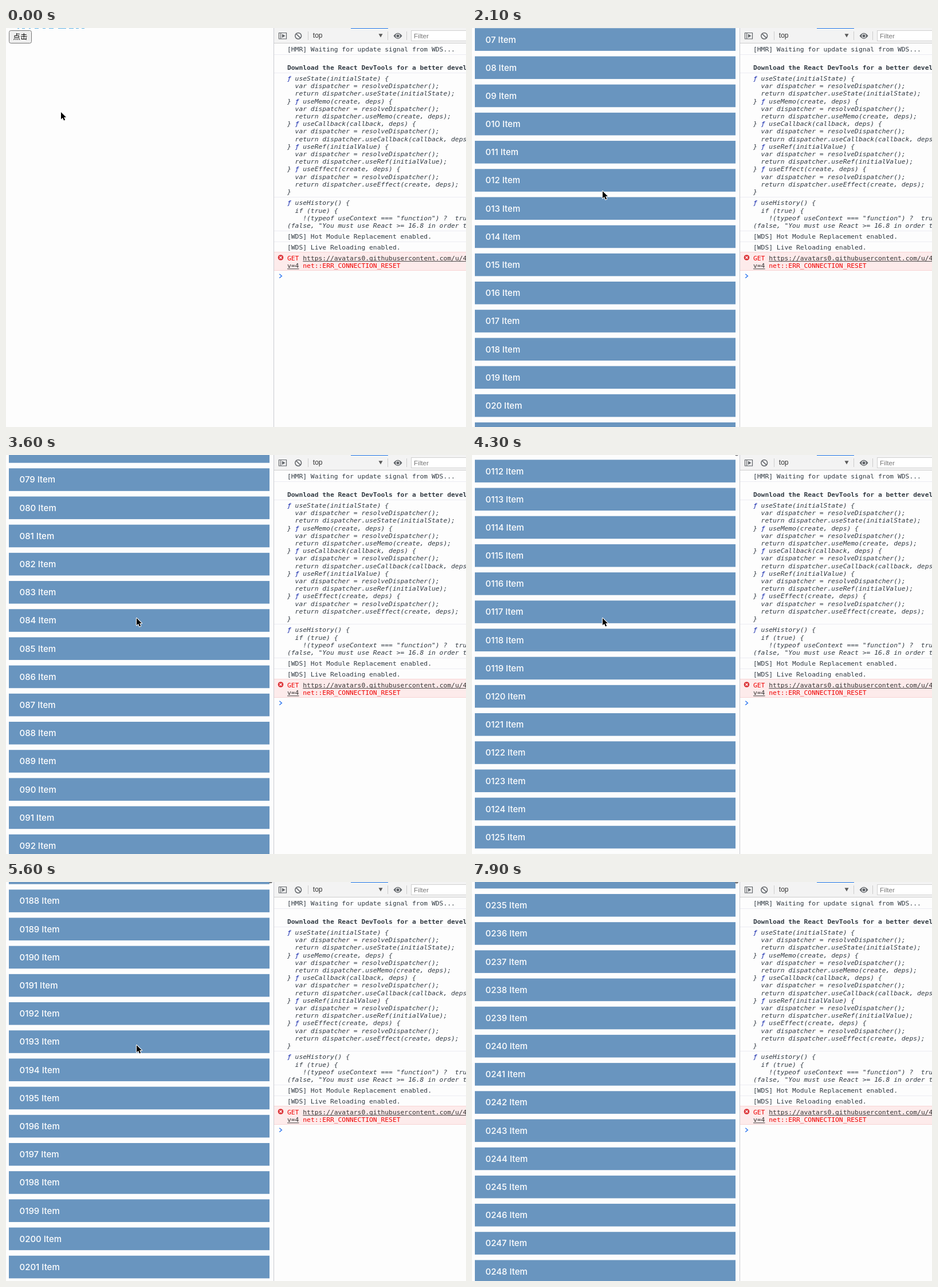
An HTML page with a canvas that plays this animation: 803x697 px, repeating every 8 s.

```html
<!DOCTYPE html>
<html lang="en">
<head>
<meta charset="utf-8">
<title>Long list and console</title>
<style>
html, body { margin: 0; width: 100%; height: 100%; overflow: hidden; background: #fdfdfd; }
canvas { display: block; width: 803px; height: 697px; }
</style>
</head>
<body>
<canvas id="stage" width="803" height="697"></canvas>
<script>
const W = 803, H = 697, LOOP = 8000, STEP = 100;
const PITCH = 49.19, BAR_H = 39.6, HOME = -0.75;
const LIST_AT = 900, CURSOR_OFF = 7600;
const MONO = '11.32px "DejaVu Sans Mono", monospace';
const SANS = '12px "Liberation Sans", Arial, sans-serif';
const CHAR = 6.816, LINE = 13.2, LEFT = 491;
const INK = '#303942';
const g = document.getElementById('stage').getContext('2d');

// [time, list index whose row is centred at y = 20]
const scroll = [[1600, HOME], [2100, 7], [2900, 46.573], [4300, 111.837],
  [5600, 187.736], [6600, 229.142], [7200, 234.58]];
const pointer = [[0, 96, 147], [150, 96, 147], [600, 26, 16], [900, 26, 16], [1500, 228, 285]];

const code = `ƒ useState(initialState) {
  var dispatcher = resolveDispatcher();
  return dispatcher.useState(initialState);
} ƒ useMemo(create, deps) {
  var dispatcher = resolveDispatcher();
  return dispatcher.useMemo(create, deps);
} ƒ useCallback(callback, deps) {
  var dispatcher = resolveDispatcher();
  return dispatcher.useCallback(callback, deps);
} ƒ useRef(initialValue) {
  var dispatcher = resolveDispatcher();
  return dispatcher.useRef(initialValue);
} ƒ useEffect(create, deps) {
  var dispatcher = resolveDispatcher();
  return dispatcher.useEffect(create, deps);
}`.split('\n');
const history = `ƒ useHistory() {
  if (true) {
    !(typeof useContext === "function") ?  true ?
(false, "You must use React >= 16.8 in order to use`.split('\n');

function rect(x, y, w, h, color) {
  g.fillStyle = color;
  g.fillRect(x, y, w, h);
}

function text(s, x, y, font, color) {
  g.font = font;
  g.fillStyle = color;
  g.fillText(s, x, y);
}

function stroke(color, width, build) {
  g.strokeStyle = color;
  g.lineWidth = width;
  g.beginPath();
  build();
  g.stroke();
}

function polyline(...pts) {
  pts.forEach(([x, y], i) => i ? g.lineTo(x, y) : g.moveTo(x, y));
}

// Monotone cubic through the scroll points
function scrollAt(t) {
  const p = scroll, last = p.length - 1;
  if (t <= p[0][0]) return p[0][1];
  if (t >= p[last][0]) return p[last][1];
  const slope = i => (p[i + 1][1] - p[i][1]) / (p[i + 1][0] - p[i][0]);
  const tangent = i => {
    if (i === 0 || i === last) return 0;
    const a = slope(i - 1), b = slope(i);
    return 2 * a * b / (a + b);
  };
  let i = 0;
  while (t > p[i + 1][0]) i++;
  const d = p[i + 1][0] - p[i][0], x = (t - p[i][0]) / d, r = 1 - x;
  return p[i][1] * (1 + 2 * x) * r * r + tangent(i) * d * x * r * r
    + p[i + 1][1] * x * x * (3 - 2 * x) - tangent(i + 1) * d * x * x * r;
}

function pointerAt(t) {
  let i = 0;
  while (i < pointer.length - 1 && t > pointer[i + 1][0]) i++;
  const a = pointer[i], b = pointer[i + 1];
  if (!b) return a.slice(1);
  const x = (t - a[0]) / (b[0] - a[0]), e = x * x * (3 - 2 * x);
  return [a[1] + (b[1] - a[1]) * e, a[2] + (b[2] - a[2]) * e];
}

function button(dy) {
  for (const [x, w] of [[20, 3], [28, 5], [40, 3], [50, 7], [64, 5], [75, 8], [91, 14], [110, 8], [122, 5], [132, 5]])
    rect(x, dy, w, 1, '#5bb0e4');
  g.beginPath();
  g.roundRect(5.5, 4.5 + dy, 39, 22, 3);
  g.fillStyle = '#efefef';
  g.fill();
  g.strokeStyle = '#767676';
  g.lineWidth = 1;
  g.stroke();
  text('点击', 12.5, 20.2 + dy, '12.4px "Noto Sans CJK SC", "Noto Sans CJK", sans-serif', '#000');
}

function list(top) {
  const first = Math.max(0, Math.floor(top) - 1);
  for (let n = first; n < top + 15; n++) {
    const y = 20.1 + (n - top) * PITCH;
    rect(5, y - BAR_H / 2, 455, BAR_H, '#6995bf');
    text(`0${n} Item`, 23.5, y + 5.4, '500 15px Inter, sans-serif', '#fff');
  }
  if (top > 90) {
    g.fillStyle = '#77787b';
    g.beginPath();
    g.roundRect(459, -8, 6, 8.6 + top / 110, 3);
    g.fill();
  }
}

function codeBlock(lines, y) {
  lines.forEach((line, i) => {
    const base = y + i * LINE, at = line.indexOf('ƒ');
    const font = 'italic ' + MONO;
    text(line.replace('ƒ', ' '), LEFT, base, font, INK);
    if (at >= 0) text('ƒ', LEFT + at * CHAR, base, font, '#0d22aa');
  });
}

function link(s, x, y) {
  text(s, x, y, MONO, '#333');
  rect(x, y + 1.5, s.length * CHAR, 1, '#444');
}

function toolbar() {
  rect(468, 0, W - 468, 26, '#f3f3f3');
  rect(468, 26, W - 468, 1, '#cdcdcd');
  rect(602, 0, 65, 1, '#1a73e8');
  const gray = '#5f6368';
  stroke(gray, 1.2, () => {
    g.rect(476.5, 8.5, 13, 10.5);
    polyline([479.7, 8.5], [479.7, 19]);
  });
  g.fillStyle = gray;
  g.beginPath();
  polyline([482, 10.5], [487.5, 13.8], [482, 17]);
  g.fill();
  stroke(gray, 1.5, () => {
    g.arc(510.2, 13.8, 5.4, 0, 7);
    polyline([506.4, 10], [514, 17.6]);
  });
  for (const x of [527, 666, 699]) rect(x, 6, 1, 15, '#cccccc');
  text('top', 535.8, 17.3, SANS, '#333');
  g.fillStyle = '#5a5a5a';
  g.beginPath();
  polyline([650.5, 10.3], [657.5, 10.3], [654, 16.5]);
  g.fill();
  g.fillStyle = gray;
  g.beginPath();
  g.moveTo(676.5, 13.8);
  g.quadraticCurveTo(684, 3.6, 691.5, 13.8);
  g.quadraticCurveTo(684, 24, 676.5, 13.8);
  g.fill();
  stroke('#f3f3f3', 1.3, () => g.arc(684, 13.8, 3.2, 0, 7));
  rect(707, 4, 100, 19, '#d0d0d0');
  rect(708, 5, 100, 17, '#fff');
  text('Filter', 712, 17.6, '11.6px "Liberation Sans", Arial, sans-serif', '#757575');
}

function consolePanel() {
  rect(467, 0, W - 467, H, '#fdfdfd');
  toolbar();
  text('[HMR] Waiting for update signal from WDS...', LEFT, 40.7, MONO, INK);
  text('Download the React DevTools for a better development', LEFT, 73, 'bold ' + MONO, INK);
  codeBlock(code, 92);
  codeBlock(history, 309.4);
  text('[WDS] Hot Module Replacement enabled.', LEFT, 368, MONO, INK);
  text('[WDS] Live Reloading enabled.', LEFT, 387, MONO, INK);
  for (const y of [46, 78, 295, 354, 373]) rect(468, y, W - 468, 1, '#ececf2');

  rect(468, 391, W - 468, 33, '#f8d5d5');
  rect(468, 392, W - 468, 31, '#fdebeb');
  g.fillStyle = '#db3236';
  g.beginPath();
  g.arc(479.5, 401, 4.8, 0, 7);
  g.fill();
  stroke('#fff', 1.3, () => {
    polyline([477.5, 399], [481.5, 403]);
    polyline([481.5, 399], [477.5, 403]);
  });
  text('GET', LEFT, 405.6, MONO, '#f00000');
  link('https://avatars0.githubusercontent.com/u/4', LEFT + 4 * CHAR, 405.6);
  link('v=4', LEFT, 418.8);
  text('net::ERR_CONNECTION_RESET', LEFT + 4 * CHAR, 418.8, MONO, '#f00000');
  stroke('#367cf1', 1.5, () => polyline([477.3, 429.8], [481.3, 433.2], [477.3, 436.6]));
  rect(467, 0, 1, H, '#c9cad2');
}

function cursor(x, y) {
  g.save();
  g.translate(x, y);
  g.beginPath();
  polyline([0, 0], [0, 12.5], [2.9, 9.8], [5, 14.6], [7.2, 13.6], [5.1, 9], [9, 9]);
  g.closePath();
  g.lineJoin = 'round';
  g.strokeStyle = '#fff';
  g.lineWidth = 2;
  g.stroke();
  g.fillStyle = '#000';
  g.fill();
  g.restore();
}

function draw(t) {
  const top = scrollAt(t);
  rect(0, 0, W, H, '#fdfdfd');
  button((HOME - top) * PITCH);
  if (t >= LIST_AT) list(top);
  consolePanel();
  if (t < CURSOR_OFF) cursor(...pointerAt(t));
}

const start = performance.now();
let shown = -1;
function tick(now) {
  const t = Math.floor(Math.max(0, now - start) % LOOP / STEP) * STEP;
  if (t !== shown) draw(shown = t);
  requestAnimationFrame(tick);
}
tick(start);
</script>
</body>
</html>
```
